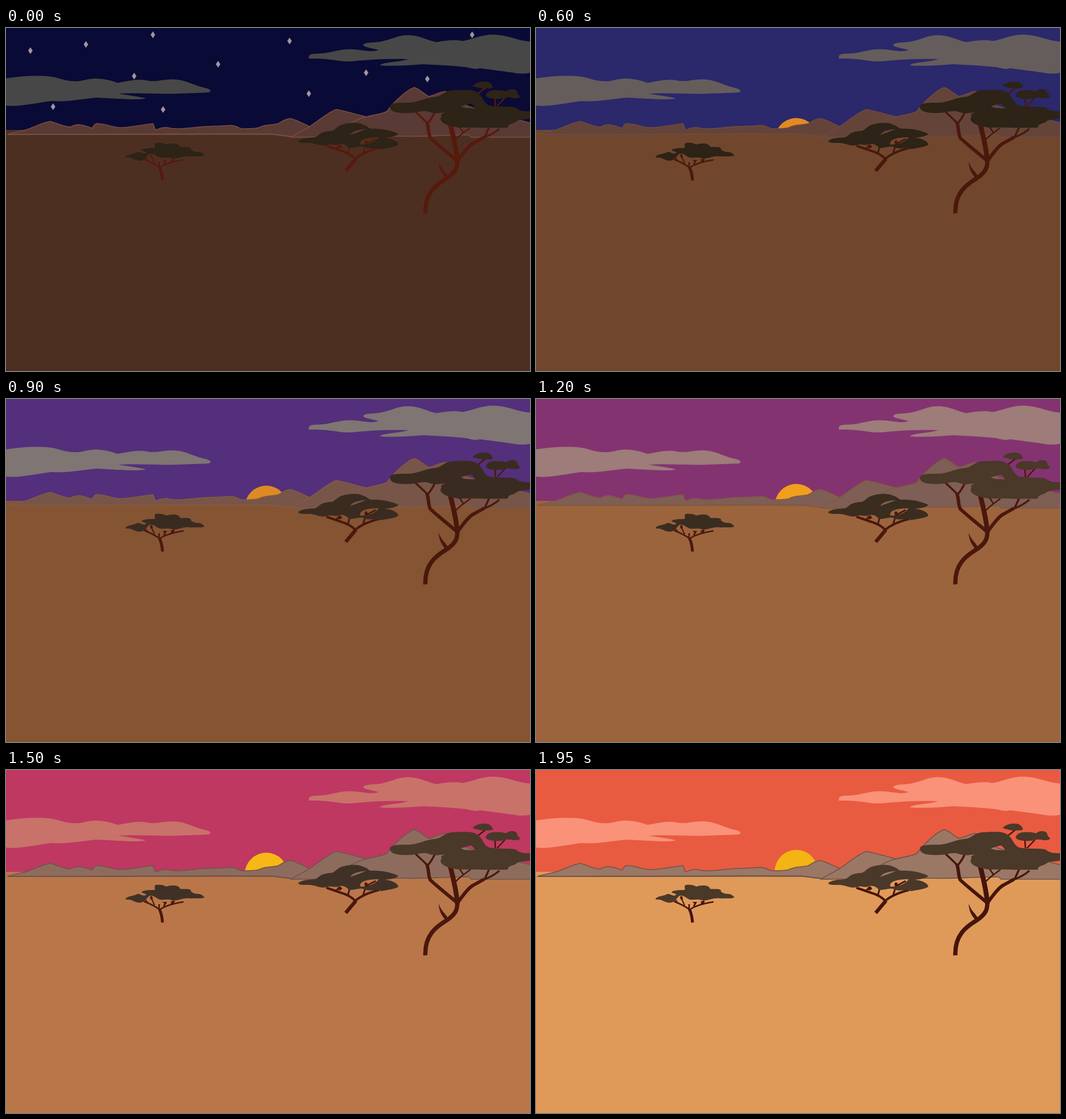
An HTML page for the animation above (2100 ms loop, 924 by 606 pixels).

```html
<!DOCTYPE html>
<html lang="en">
<head>
<meta charset="utf-8">
<title>Savanna sunrise</title>
<style>
html, body { margin: 0; width: 100%; height: 100%; overflow: hidden; }
svg { display: block; width: 100%; height: 100%; background: var(--sky); }
.cloud { fill: var(--cloud); }
.hill { fill: var(--hill); stroke: var(--ridge); stroke-width: 1.6; stroke-linejoin: round; }
.ridge { fill: none; stroke: var(--ridge); stroke-width: 1.6; }
.base { stroke-width: 2.2; }
.wood { fill: none; stroke: var(--wood); stroke-linejoin: round; }
.bark { fill: var(--wood); }
.leaf { fill: var(--leaf); fill-rule: evenodd; }
.near { fill: var(--near); }
</style>
</head>
<body>
<svg viewBox="0 0 924 606" preserveAspectRatio="none">
  <path id="stars" fill="var(--star)"/>
  <path class="cloud" d="M0 89C25 85 55 83 80 86C95 88 105 95 125 94C140 93 150 87 168 90C185 92 190 95 197 97C215 94 230 89 250 93C265 96 280 89 300 91C320 93 335 103 352 106C364 109 362 114 355 114C340 115 320 115 300 116C270 117 230 114 198 116C215 119 235 121 246 124C240 128 200 125 160 123C135 125 110 131 80 129C50 133 20 140 0 137Z"/>
  <path class="cloud" d="M534 50C537 44 545 46 555 45C575 44 590 35 617 38C635 40 645 43 657 39C645 35 630 34 630 30C633 24 650 27 665 23C685 18 695 11 715 13C735 15 745 23 760 25C775 22 790 20 805 23C825 20 840 10 865 12C890 14 900 22 924 24V79C915 81 905 81 895 79C875 76 850 73 835 71C830 74 820 71 810 69C790 67 760 65 735 64C710 66 680 68 659 66C665 60 690 61 710 55C680 54 640 55 610 59C585 60 575 53 534 54Z"/>
  <path fill="var(--ground)" d="M0 180H924V606H0Z"/>
  <path fill="var(--sky)" d="M395 168H924V181H395Z"/>
  <circle id="sun" cx="459" r="38" fill="var(--sun)"/>
  <path fill="var(--ground)" d="M0 187H924V606H0Z"/>

  <path class="hill" d="M3 187.500L35 180C50 175 65 167 78 165C90 168 100 174 113 175C125 169 130 169 152 177C155 172 157 168 162 169C175 169 185 175 200 176C220 176 245 170 259 169C262 173 261 179 265 180C275 175 283 175 290 177C300 179 310 178 330 176C350 173 375 174 395 172C405 172 408 176 416 178C430 178 440 178 446 176C455 170 470 172 480 169C490 163 495 160 502 160C515 163 525 170 536 174L545 185L502 192L470 187.500C400 187 350 187.500 300 187.500S140 187.500 3 188Z"/>
  <path class="ridge base" d="M3 188C120 187.500 200 188 300 187.700S400 187 470 187.700L502 191.500"/>
  <path class="hill" d="M502 193L536 174C555 160 575 145 583 144C595 146 620 153 635 157C650 153 665 152 672 147C680 135 705 110 720 105C730 108 738 118 746 121C755 119 765 113 775 112C787 117 800 130 812 137L830 143L926 168V193H820L816 189C780 188 740 193 690 191C630 193 560 192 502 193Z"/>
  <path class="ridge" d="M635 157Q622 160 608 168"/>

  <g class="wood">
    <path stroke-width="5" d="M276 269.500Q275 255 270.500 246"/>
    <path stroke-width="2.600" d="M271 247Q263 240 243 232M271 247Q282 238 313 233M270 245V237M278 241L282 234M291 237L296 231"/>
    <path stroke-width="2" d="M262 239L257 228M250 235L246 229"/>
    <path stroke-width="6.500" d="M599 252.500L617 231"/>
    <path stroke-width="4" d="M617 232Q606 221 591 217L565 208M616 231Q630 219 658 212"/>
    <path stroke-width="3" d="M603 221L606 209M580 214L589 208M630 220L635 205L652 196"/>
    <path stroke-width="7.500" d="M739.500 327.500C738 292 758 277 778 265C795 253 796 245 796 232"/>
    <path stroke-width="8.500" d="M796 236C794 210 788 190 783 168"/>
    <path stroke-width="6" d="M796 235C775 217 758 204 748 194C744 185 746 177 742 166M796 235C809 217 817 207 825 203L843 193"/>
    <path stroke-width="3.500" d="M743 168L722 148M744 168Q751 160 756 149M841 194Q857 189 870 178M844 193L852 175"/>
    <path stroke-width="2.500" d="M793 197Q803 187 819 176M806 184L800 175M831 117L845 106M863 138L862 123M866 138L880 123"/>
  </g>
  <path class="bark" d="M763 236C767 249 775 253 780 263L774 264C768 257 763 248 763 236ZM254 224Q258 220 259 228L255 229ZM276 233H284L281 238ZM290 232H298L294 238ZM584 209Q589 202 593 210L588 213ZM632 201Q635 195 638 202L633 206Z"/>

  <path class="leaf" d="M211 227C216 222 225 223 232 219C238 219 237 221 243 222C250 221 248 219 240 217C237 215 243 212 262 212C264 209 260 206 264 203C272 202 278 203 283 206C292 203 305 203 307 210C315 211 320 209 326 212C325 216 330 217 335 219C343 218 347 222 350 225C345 228 335 226 325 227C315 225 305 230 295 231C285 227 280 230 272 229C266 228 262 221 254 222C247 225 248 233 236 234.500C225 234 222 227 211 229Z"/>
  <path class="leaf" d="M515 200C520 195 530 194 545 193C553 190 552 184 570 182C580 183 582 174 592 171C605 167 620 166 630 171C640 174 637 177 645 178C660 177 680 181 692 187C688 192 675 193 668 194C680 195 690 199 692 206C685 211 675 211 662 214C650 210 640 215 632 211C622 207 615 213 605 212C600 206 593 203 586 206C578 208 573 204 565 207C555 210 545 203 535 203C527 203 518 204 515 200ZM607 189C611 182 621 179.500 635 178.500C626 182 616 186 607 189ZM625 206C622 197 636 193 657 193C654 198 645 206 625 206Z"/>
  <path class="leaf near" d="M677 140C676 132 690 132 710 132C725 132 740 123 755 122C770 121 772 110 790 110C808 109 823 108 831 114C841 121 842 132 850 136C858 140 885 138 898 140C905 147 915 147 924 147V160C915 162 905 161 900 165C895 170 885 168 885 176C850 177 820 175 800 176C785 174 780 172 775 170C765 165 765 160 768 157C766 153 768 151 775 149C765 150 755 152 745 148C735 144 725 150 710 150C690 151 678 148 677 140ZM802 138C808 137 814 134 820 133.500C824 136 826 139 827 142C818 141 808 143 802 138Z"/>
  <path class="leaf near" d="M823 102C830 95 840 94 848 95C855 96 858 102 859 105C852 108 845 106 840 107C832 105 825 104 823 102ZM846 120C846 113 855 109 865 110C872 109 878 111 882 112C885 108 893 107 898 109C903 111 900 116 905 119C909 122 905 124 895 124C885 122 882 123 878 124C865 127 850 125 846 120Z"/>
</svg>
<script>
const LOOP = 2100, STEP = 150;
const times = [0, 300, 600, 900, 1200, 1500, 1950];
const sunY = [212, 205, 197, 191, 188, 184, 179];
const palette = {
  sky: '0a0a36 1c1a52 2b286b 542f7b 843371 be3861 e85b41',
  star: 'a3949c 5f5684 2b286b 542f7b 843371 be3861 e85b41',
  cloud: '474747 575757 655d5b 7f7573 9d7c79 c8726a f99279',
  ground: '4d2f22 603d2b 70472d 845433 9c643d b97749 df9a5a',
  hill: '593a35 65453c 644439 775548 7e5e55 8d6c5e 9b7766',
  ridge: '7a4c42 75504a 70493f 845a42 80593f 6f554a 705449',
  sun: 'ec9022 ec9022 e28a24 de8a24 f0a01c f7b816 f4b414',
  wood: '561a0d 501a0d 4a180c 4a180c 4a180c 4a180c 45150b',
  leaf: '2d2316 2d2316 2d2316 3a2b20 3a2d20 403127 4a3829',
  near: '2d2316 2d2316 2d2316 3a2b20 4a3829 4a3829 4a3829'
};
for (const name in palette)
  palette[name] = palette[name].split(' ').map(hex => hex.match(/../g).map(h => parseInt(h, 16)));

const starAt = [[43, 40], [141, 29], [259, 12], [374, 64], [500, 23], [226, 85],
  [83, 139], [277, 144], [534, 116], [635, 79], [743, 90], [822, 12]];
document.getElementById('stars').setAttribute('d',
  starAt.map(([x, y]) => `M${x} ${y - 6}l4 6l-4 6l-4 -6z`).join(''));

const sun = document.getElementById('sun');
const style = document.documentElement.style;
const mix = (a, b, p) => a + (b - a) * p;
let shown = -1;

function draw(t) {
  let i = 0;
  while (i < times.length - 2 && t >= times[i + 1]) i++;
  const p = (t - times[i]) / (times[i + 1] - times[i]);
  for (const name in palette) {
    const [a, b] = palette[name].slice(i, i + 2);
    style.setProperty('--' + name, `rgb(${a.map((v, k) => Math.round(mix(v, b[k], p)))})`);
  }
  sun.setAttribute('cy', mix(sunY[i], sunY[i + 1], p));
}

function tick() {
  const t = Math.floor(performance.now() % LOOP / STEP) * STEP;
  if (t !== shown) draw(shown = t);
  requestAnimationFrame(tick);
}
tick();
</script>
</body>
</html>
```
